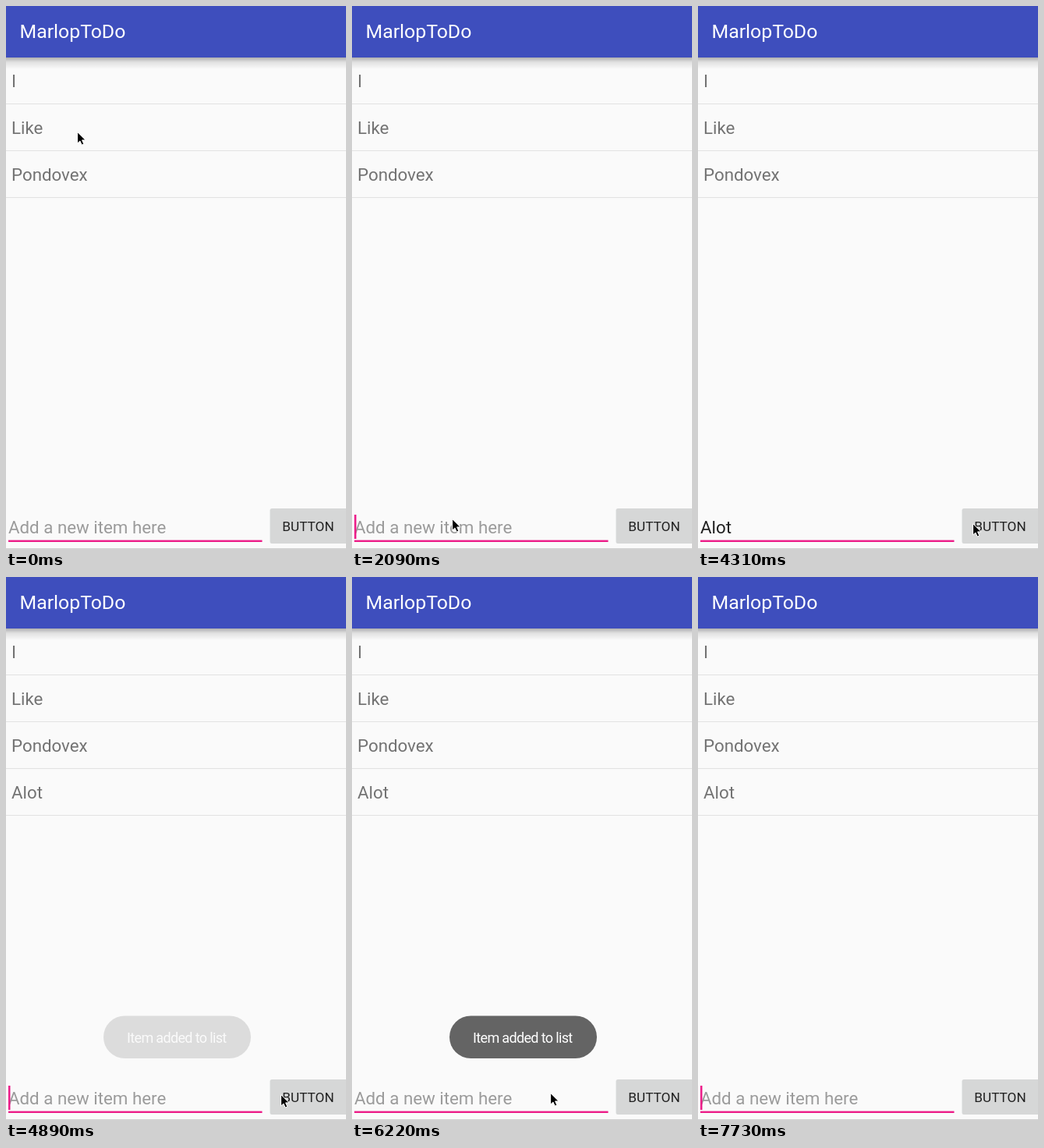
Write an HTML page that moves like this. It is 436 by 696 pixels and loops after 7.83 s.

```html
<!DOCTYPE html>
<html lang="en">
<head>
<meta charset="utf-8">
<title>To-do list</title>
<style>
  html, body { margin: 0; width: 100%; height: 100%; overflow: hidden; background: #fafafa; }
  svg { display: block; width: 436px; height: 696px; font-family: Roboto, "Noto Sans", sans-serif; }
  .item, .field { font-size: 22.3px; }
  .item { fill: #737373; }
  .accent { fill: #ec1c88; }
</style>
</head>
<body>
<svg viewBox="0 0 436 696">
  <defs>
    <linearGradient id="shade" x2="0" y2="1">
      <stop offset="0" stop-opacity=".3"/>
      <stop offset=".4" stop-opacity=".1"/>
      <stop offset="1" stop-opacity="0"/>
    </linearGradient>
  </defs>
  <rect width="436" height="696" fill="#fafafa"/>
  <g id="list"></g>

  <rect y="66" width="436" height="15" fill="url(#shade)"/>
  <rect width="436" height="66" fill="#3e4ebd"/>
  <text x="17.5" y="41" font-size="24.8" fill="#fff">MarlopToDo</text>

  <text id="hint" class="field" x="3" y="676" fill="#9b9b9b">Add a new item here</text>
  <text id="typed" class="field" x="3" y="676" fill="#212121"></text>
  <rect class="accent" x="3" y="684.6" width="325.5" height="2.4"/>
  <rect id="caret" class="accent" y="652" width="2.5" height="31"/>
  <rect y="695" width="436" height="1" fill="#d0d0d0"/>

  <rect id="button" x="338.5" y="644" width="100" height="45" rx="2.5"/>
  <text x="354.3" y="673" font-size="17.2" fill="#212121">BUTTON</text>

  <g id="toast">
    <rect x="125" y="562.5" width="189" height="54.5" rx="27.25" fill="#646464"/>
    <text x="155" y="597" font-size="18" letter-spacing="-.65" fill="#fff">Item added to list</text>
  </g>

  <path id="pointer" d="M.6 .5V15L3.9 12L6.2 17.1L8.8 15.9L6.6 10.9H11.1Z"
        fill="#000" stroke="#fff" stroke-linejoin="round"/>
</svg>
<script>
const LOOP = 7830, TICK = 148;
const FOCUS = 6, TYPE = 16, PRESS = 30, ADD = 31;
const TOAST_IN = 32.65, TOAST_OUT = 46.9, FADE = 1.8;
const BLINK = 3.4;
const WORD = "Alot";

const HOME = { x: 91, y: 161 };
const moves = [
  { at: 1, ticks: 2, x: 151, y: 550 },
  { at: 4, ticks: 2, x: 128, y: 657 },
  { at: 23, ticks: 3, x: 352, y: 663 },
  { at: 36, ticks: 3, x: 254, y: 661 },
  { at: 45, ticks: 3, x: 362, y: 702 }
];

const $ = id => document.getElementById(id);
const clamp = (v, max = 1) => Math.min(max, Math.max(0, v));
const show = (el, on) => el.setAttribute("visibility", on ? "visible" : "hidden");

$("list").innerHTML = ["I", "Like", "Pondovex", WORD].map((label, i) => `
  <g><text class="item" x="7" y="${104 + 60 * i}">${label}</text>
  <rect y="${125 + 60 * i}" width="436" height="1" fill="#e2e2e2"/></g>`).join("");
const newItem = $("list").lastElementChild;

function pointerAt(tick) {
  return moves.reduce((from, to) => {
    const p = clamp((tick - to.at + 1) / to.ticks);
    return { x: from.x + (to.x - from.x) * p, y: from.y + (to.y - from.y) * p };
  }, HOME);
}

// The caret blinks steadily, restarting in its visible phase after each input.
function caretOn(tick) {
  if (tick < FOCUS) return false;
  const lastInput = tick >= ADD ? ADD
    : Math.min(tick, tick >= TYPE ? TYPE + 2.4 : FOCUS + .4);
  return Math.floor((tick - lastInput) / BLINK) % 2 === 0;
}

function draw(time) {
  const tick = Math.floor(time / TICK);
  const added = tick >= ADD;
  const text = added ? "" : WORD.slice(0, clamp(tick - TYPE + 1, WORD.length));

  const { x, y } = pointerAt(tick);
  $("pointer").setAttribute("transform", `translate(${x} ${y})`);

  $("typed").textContent = text;
  show($("hint"), !text);
  show($("caret"), caretOn(tick));
  const textWidth = text ? $("typed").getComputedTextLength() : 0;
  $("caret").setAttribute("x", Math.floor(3 + textWidth));

  show(newItem, added);
  $("button").setAttribute("fill", tick === PRESS ? "#c4c5c5" : "#d6d7d7");
  $("toast").setAttribute("opacity",
    Math.min(clamp((tick - TOAST_IN) / FADE), clamp((TOAST_OUT - tick) / FADE)));
}

const start = performance.now();
function play() {
  draw((performance.now() - start) % LOOP);
  requestAnimationFrame(play);
}
play();
</script>
</body>
</html>
```
